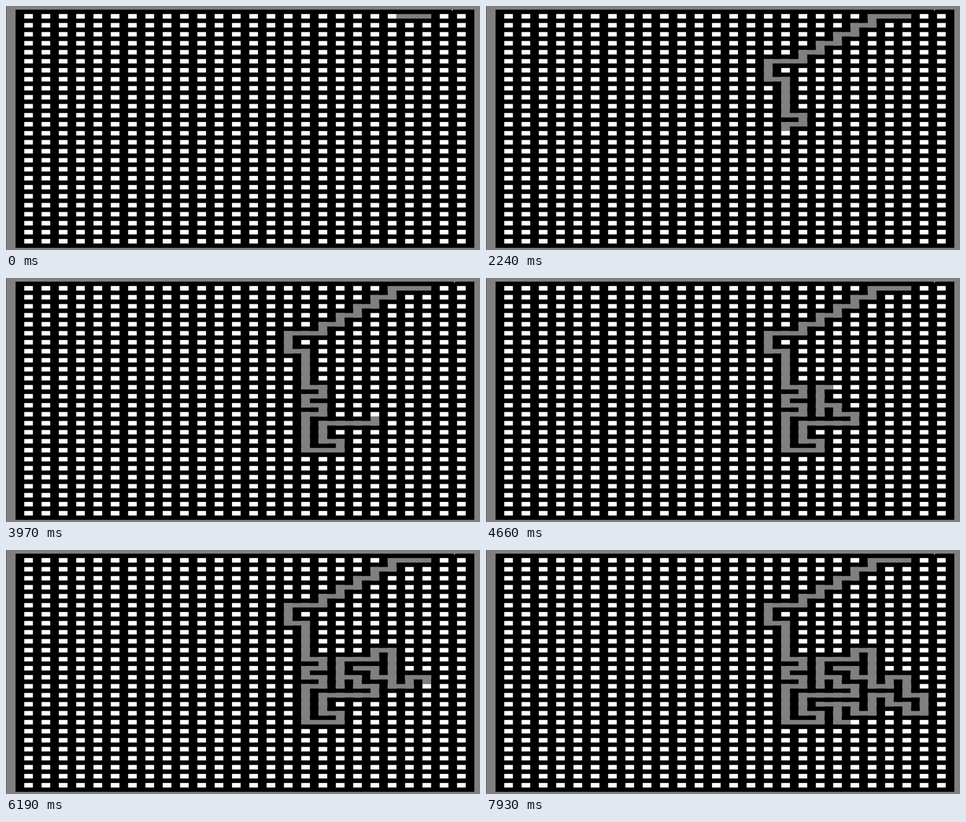
These frames come from a looping animation (1042 by 538 pixels, 8000 ms). An HTML page without scripts:

```html
<!DOCTYPE html>
<html lang="en">
<head>
<meta charset="utf-8">
<title>Maze carving</title>
<style>
  @property --n { syntax: "<number>"; inherits: true; initial-value: 0; }

  html, body { margin: 0; width: 100%; height: 100%; overflow: hidden; background: #808080; }
  svg { display: block; width: 1042px; height: 538px; }

  /* --n counts the carved cells */
  .maze { fill: none; animation: carve 8s step-end infinite; }
  .cells { stroke-dasharray: .5 .5; }
  .path {
    stroke: #808080;
    stroke-width: .5;
    stroke-dasharray: calc(max(0, var(--n) - var(--from)) * 1px) 99px;
  }
  .dot { animation: dot 8s step-end infinite; }

  @keyframes carve {
    0% { --n: 0; }
    1.5% { --n: 1; animation-timing-function: steps(8); }
    11.375% { --n: 9; }
    13% { --n: 10; animation-timing-function: steps(3); }
    16.5% { --n: 13; }
    17.75% { --n: 14; animation-timing-function: steps(4); }
    22.875% { --n: 18; }
    24.125% { --n: 19; animation-timing-function: steps(7); }
    32.75% { --n: 26; }
    34.375% { --n: 27; animation-timing-function: steps(5); }
    40.75% { --n: 32; }
    42% { --n: 33; animation-timing-function: steps(2); }
    44.25% { --n: 35; }
    45.5% { --n: 36; animation-timing-function: steps(7); }
    54.75% { --n: 43; }
    56% { --n: 44; animation-timing-function: steps(2); }
    58.25% { --n: 46; }
    59.875% { --n: 47; animation-timing-function: steps(4); }
    64.625% { --n: 51; }
    66.25% { --n: 52; animation-timing-function: steps(2); }
    68.5% { --n: 54; }
    69.75% { --n: 55; animation-timing-function: steps(2); }
    72% { --n: 57; }
    73.875% { --n: 58; animation-timing-function: steps(8); }
    83.75% { --n: 66; }
    84.75% { --n: 67; }
    86% { --n: 68; }
    87.625% { --n: 69; animation-timing-function: steps(5); }
    94% { --n: 74; }
    95.25% { --n: 75; animation-timing-function: steps(3); }
    99.125%, 100% { --n: 78; }
  }
  @keyframes dot {
    0% { transform: none; }
    3% { transform: translateX(2px); }
    6% { transform: translateX(4px); }
    9%, 100% { transform: translateX(5px); }
  }
</style>
</head>
<body>
<svg viewBox="0 0 1042 538">
  <rect width="1042" height="538" fill="#808080"/>
  <rect width="1" height="538" fill="#3c4450"/>
  <rect y="524" width="1" height="14" fill="#2c50a0"/>
  <rect x="21" y="8" width="1008.6" height="525.3"/>
  <rect class="dot" x="980" y="8" width="2" height="2" fill="#fff"/>

  <!-- one unit is one cell pitch, the origin is the centre of the first cell -->
  <g class="maze" transform="translate(49.55 22.58) scale(38.06 19.84)">
    <path class="cells" stroke="#fff" stroke-width="25.5" d="M12.5-.25V25.25"/>
    <path class="cells" stroke="#000" stroke-width="26" d="M.25 12.5H24.75"/>
    <path class="path" style="--from:-2" d="M23.25 0H21v1h-1v1h-1v1h-1v1h-1v1h-2v2h1v4h1v1h-1v1h1v1h-1v4h2v-1h-1v-2h3v-1h-1v-1h-1v1.25"/>
    <path class="path" style="--from:43.5" d="M18 12.75V11h2v-1h1v3h-1v-1h-1.25"/>
    <path class="path" style="--from:55.5" d="M21 13.25V14h1v-1h1v2h1v2h-1v-1h-1v-1h-1v2h-1v-1h-2.25"/>
    <path class="path" style="--from:75.5" d="M19 16.25V18h.75"/>
  </g>
</svg>
</body>
</html>
```
